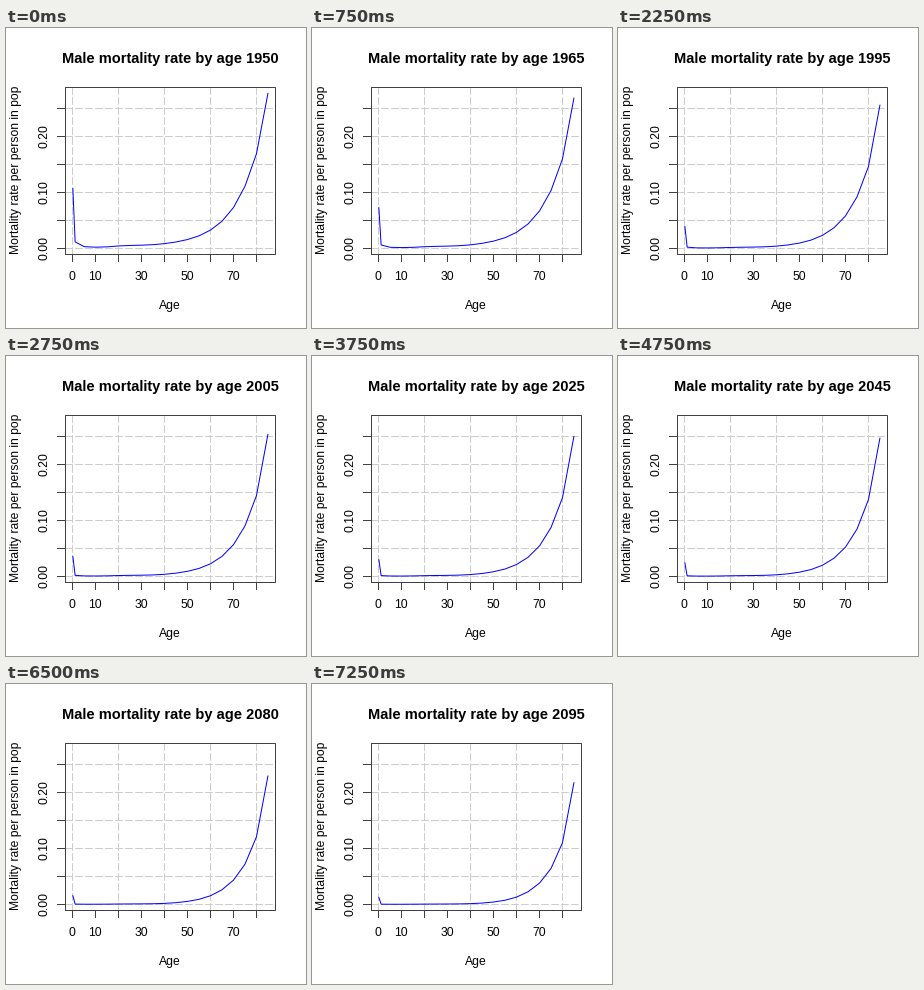
A matplotlib script that plays this animation: 300x300 px, repeating every 7500 ms.

```python
import numpy as np
import matplotlib.pyplot as plt
from matplotlib.animation import FuncAnimation

plt.rcParams.update({
    "font.family": "Liberation Sans",
    "text.hinting": "force_autohint",
    "toolbar": "None",
})

SIZE, DPI = 300, 100
PX = 72 / DPI  # points per pixel
LEFT, RIGHT, TOP, BOTTOM = 59.04, 269.76, 59.04, 226.56
TICK = 7.2
FRAMES, INTERVAL = 30, 250
INK, GRID = "#404040", "#cccccc"

# Deaths per thousand at a few ages, first and last year
KEY_AGES = [0, 1, 5, 10, 20, 35, 50, 65, 75, 80, 85]
FIRST = [107, 11.5, 3, 2.1, 4.3, 6.6, 15.8, 48.5, 111, 169, 277]
LAST = [12.5, 0.3, 0.2, 0.2, 0.45, 0.8, 4.2, 22.5, 64, 110, 217.5]

# Share of the decline reached over time, for the youngest and the oldest
KEY_YEARS = [1950, 1985, 2025, 2065, 2095]
YOUNG = [0, 0.393, 0.593, 0.793, 1]
OLD = [0, 0.28, 0.42, 0.585, 1]

AGES = np.array([0, 1, *range(5, 90, 5)])


def smooth(x, xs, ys):
    """Cubic Hermite curve through a few points."""
    xs, ys = np.asarray(xs), np.asarray(ys)
    slope = np.gradient(ys, xs)
    i = np.clip(np.searchsorted(xs, x, "right") - 1, 0, len(xs) - 2)
    span = xs[i + 1] - xs[i]
    t = (x - xs[i]) / span
    ease = t * t * (3 - 2 * t)
    return (ys[i] * (1 - ease) + ys[i + 1] * ease
            + span * t * (1 - t) * (slope[i] * (1 - t) - slope[i + 1] * t))


LOG_FIRST = smooth(AGES, KEY_AGES, np.log(FIRST))
LOG_LAST = smooth(AGES, KEY_AGES, np.log(LAST))


def rates(year):
    young, old = (smooth(year, KEY_YEARS, ys) for ys in (YOUNG, OLD))
    share = young + (old - young) * AGES / AGES[-1]
    return np.exp(LOG_FIRST + (LOG_LAST - LOG_FIRST) * share) / 1000


def to_x(age):
    return LEFT + (RIGHT - LEFT) * (age + 3.4) / 91.8


def to_y(rate):
    return BOTTOM - (BOTTOM - TOP) * (rate / 0.277 + 0.04) / 1.08


fig = plt.figure(figsize=(SIZE / DPI, SIZE / DPI), dpi=DPI, facecolor="white")
ax = fig.add_axes([0, 0, 1, 1])
ax.set(xlim=(0, SIZE), ylim=(SIZE, 0))
ax.axis("off")


def line(xs, ys, color, z, **kw):
    return ax.plot(xs, ys, color=color, lw=PX, zorder=z, snap=False, **kw)[0]


def rule(xs, ys, color=INK, z=3, **kw):
    """Straight line centred on whole pixels."""
    line(np.floor(xs) + 0.5, np.floor(ys) + 0.5, color, z,
         solid_capstyle="projecting", solid_joinstyle="miter", **kw)


def grid_line(xs, ys):
    rule(xs, ys, GRID, 1, ls=(0, (7, 3)), dash_capstyle="round")


def label(x, y, text, size=12.1, angle=0, **kw):
    return ax.text(x, y, text, fontsize=size * PX, rotation=angle,
                   rotation_mode="anchor", ha="center", va="baseline", **kw)


age_ticks = np.arange(0, 81, 10)
rate_ticks = np.arange(6) * 0.05

for age in age_ticks[::2]:
    grid_line([to_x(age)] * 2, [BOTTOM, TOP])
for rate in rate_ticks:
    grid_line([LEFT, RIGHT], [to_y(rate)] * 2)

# Ticks and frame
for age in age_ticks:
    rule([to_x(age)] * 2, [BOTTOM, BOTTOM + TICK])
for rate in rate_ticks:
    rule([LEFT, LEFT - TICK], [to_y(rate)] * 2)
rule([LEFT, RIGHT, RIGHT, LEFT, LEFT], [BOTTOM, BOTTOM, TOP, TOP, BOTTOM])

for age in (0, 10, 30, 50, 70):
    label(to_x(age) - 0.6, 252, str(age))
for rate in rate_ticks[::2]:
    label(42, to_y(rate) - 0.6, f"{rate:.2f}", angle=90)

mid_x, mid_y = (LEFT + RIGHT) / 2, (TOP + BOTTOM) / 2
label(mid_x - 0.6, 281, "Age")
label(13, mid_y - 0.6, "Mortality rate per person in pop", angle=90)
title = label(mid_x, 35, "", size=14.6, weight="bold")
curve = line(to_x(AGES), to_y(rates(1950)), "blue", 2,
             solid_capstyle="round", solid_joinstyle="round")


def update(i):
    year = 1950 + 5 * i
    title.set_text(f"Male mortality rate by age {year}")
    curve.set_ydata(to_y(rates(year)))
    return title, curve


anim = FuncAnimation(fig, update, frames=FRAMES, interval=INTERVAL,
                     repeat=True, repeat_delay=0)
plt.show()
```
